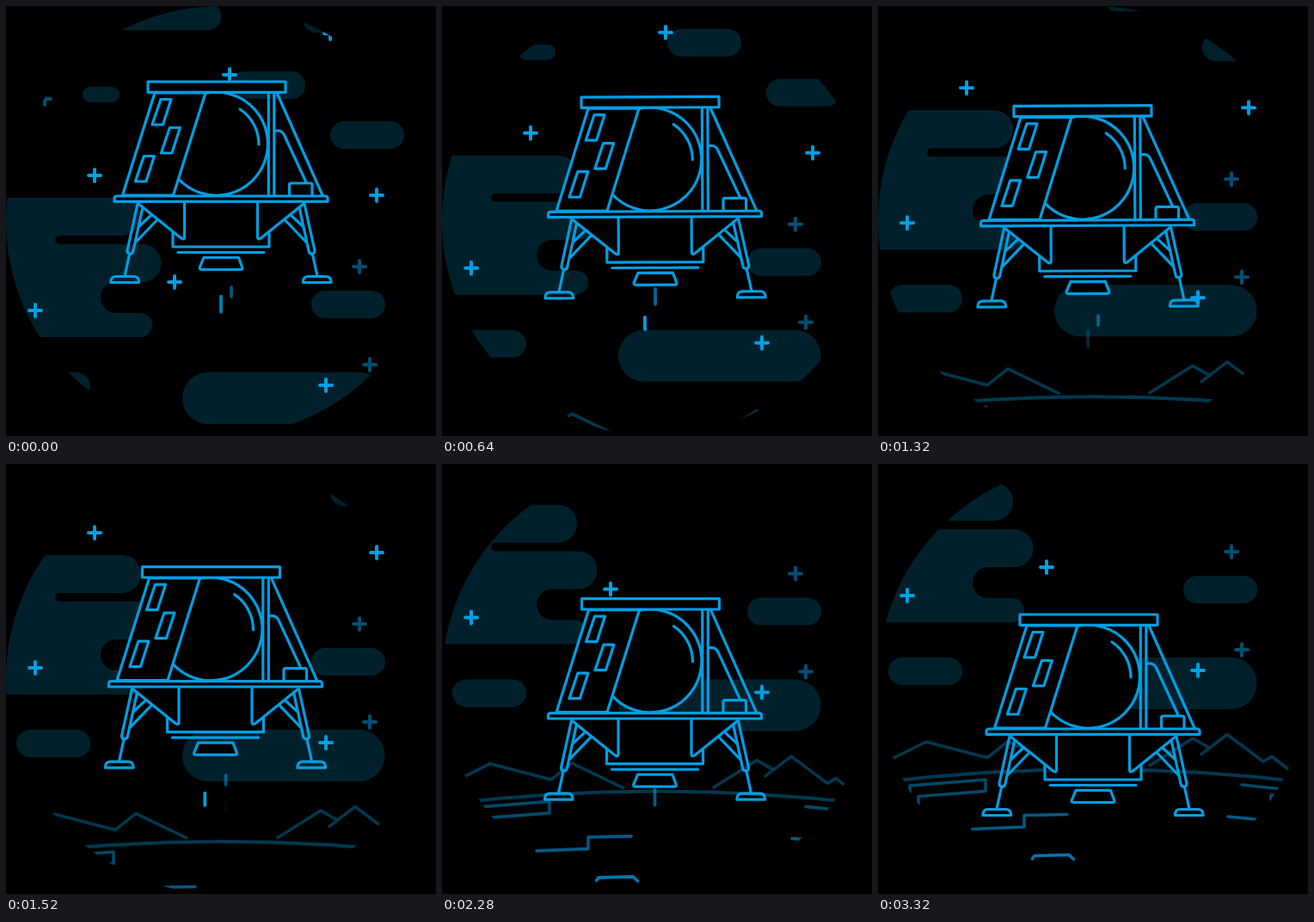
An HTML page with a canvas that plays this animation: 500 px wide and 500 px high, repeating every 3.44 s.

```html
<!DOCTYPE html>
<html lang="en">
<head>
<meta charset="utf-8">
<title>Lunar landing</title>
<style>
html, body { margin: 0; width: 100%; height: 100%; overflow: hidden; background: #000; }
canvas { display: block; width: 500px; height: 500px; }
</style>
</head>
<body>
<canvas id="stage" width="500" height="500"></canvas>
<script>
const ctx = document.getElementById('stage').getContext('2d');
const LOOP = 3440, STEP = 40, TOUCHDOWN = 2610, SETTLED = 3320, DROP = 201;
const BLUE = '#009fe3', DIM = '#004f73', CLOUD = '#00212c';
const FAR = '#00384f', MID = '#004a68', NEAR = '#005a82', FRONT = '#0077ab';

// Key poses of the lander: time, x, y, degrees
const poses = [
  [0, 0, 0, 0], [640, -2.5, 17.8, -0.25], [1080, -5.5, 23.9, -0.5], [1520, -6.5, 31.7, 0],
  [1880, -2, 39.1, 0.25], [2280, -2.5, 68.7, 0], [TOUCHDOWN, 0, 87, 0]
];

function slope(i, k) {
  const b = poses[i + 1], a = poses[Math.max(i - 1, 0)];
  return b ? (b[k] - a[k]) / (b[0] - a[0]) : 0;
}

// Smooth curve through the key poses
function track(t, k) {
  t = Math.min(t, TOUCHDOWN);
  const i = Math.max(poses.findIndex(p => p[0] >= t) - 1, 0);
  const a = poses[i], b = poses[i + 1], d = b[0] - a[0], u = (t - a[0]) / d, v = 1 - u;
  return v * v * (1 + 2 * u) * a[k] + u * u * (1 + 2 * v) * b[k] +
         u * v * d * (v * slope(i, k) - u * slope(i + 1, k));
}

function draw(path, stroke, width, fill) {
  const p = new Path2D(path);
  if (fill) { ctx.fillStyle = fill; ctx.fill(p); }
  if (stroke) { ctx.strokeStyle = stroke; ctx.lineWidth = width; ctx.stroke(p); }
}

function line(x1, y1, x2, y2, color, width) {
  draw(`M${x1} ${y1}L${x2} ${y2}`, color, width);
}

function pill(x, y, w, h) {
  ctx.beginPath();
  ctx.roundRect(x, y, w, h, h / 2);
  ctx.fillStyle = CLOUD;
  ctx.fill();
}

function star(x, y, color) {
  draw(`M${x - 7} ${y}h14M${x} ${y - 7}v14`, color, 4);
}

const cloudBank = 'M-20 223H135a22 22 0 0 1 0 44H62a5 5 0 0 0 0 10H158.5a22 22 0 0 1 0 44H128' +
  'a18 18 0 0 0 0 36H156a14 14 0 0 1 0 28H-20Z';
const stars = [[260, 80], [103, 197], [431, 220], [196, 321], [34, 354], [372, 441], [377, 32]];
const dimStars = [[411, 303], [423, 417], [45, 108]];

function sky() {
  draw(cloudBank, null, 0, CLOUD);
  pill(89, 94, 43, 18);
  pill(205, 426, 235.5, 60);
  pill(100, -4, 150.5, 32);
  for (const [x, y] of [[262, 76], [377, 134], [355, 331], [12, 426], [345, -1]]) pill(x, y, 86, 32);
  stars.forEach(([x, y]) => star(x, y, BLUE));
  dimStars.forEach(([x, y]) => star(x, y, DIM));
}

function ground() {
  draw('M0 351L56 323L127 341.5L151 322.5L210 351', FAR, 3.6);
  draw('M316 350.5L366 319L385 330M376 337.5L406 314.5L448 346L458 340L486 362', FAR, 3.6);
  draw('M0 370.5Q250 339.5 500 370.5', FAR, 4);
  draw('M125 367L37 374V383M125 367V380.5L47 386.5V395', MID, 3.6);
  draw('M423 373L470 378M472 385H457V392', MID, 3.6);
  draw('M110 424.5L170 422V408.5L220 407.5M407 410L439 413', NEAR, 3.6);
  draw('M179.5 459L182 455.5L222 454.5L227.5 459.5', FRONT, 3.6);
}

const leg = 'M153 230L141 284.5Q141 288 144 288Q147 288.5 147.8 285.5L159 234' +
  'M169 243L154 257M176 248.5L150.5 275M143.5 289L138 314' +
  'M122 321.5V320Q122.5 314.5 128 314.5H148.5Q154 314.5 154.5 320V321.5Z';
const gusset = 'M154 230L203 269.5Q207.5 273 207.5 268V228';

function lander() {
  const w = 3.2;
  draw('M194 228H306V280H194Z', null, 0, '#000');
  draw('M194 262V280H306V262M200 286.5H300', BLUE, w);
  for (const side of [1, -1]) {
    ctx.save();
    ctx.translate(250, 0);
    ctx.scale(side, 1);
    ctx.translate(-250, 0);
    draw(gusset, BLUE, w, '#000');
    draw(leg, BLUE, w);
    ctx.restore();
  }
  draw('M230 292.5H270.5L274.8 304Q275.2 306.5 272.5 306.5H227.5Q224.8 306.5 225.2 304Z', BLUE, w, '#000');

  draw('M232 101.5A60 60 0 1 1 200.5 201', BLUE, w, '#000');
  draw('M173 101L135.5 220H194.5L232 101Z', BLUE, w, '#000');
  for (const [x, y] of [[180, 108.5], [190.4, 141.5], [160.4, 174.5]]) {
    draw(`M${x} ${y}h12l-9.5 29.5h-12.5Z`, BLUE, w);
  }
  draw('M272 120A49 49 0 0 1 294 161', BLUE, w);
  draw('M305.3 101V220M311.8 101V220M315 101L368 220', BLUE, w);
  draw('M312 145H316Q321 145 323.5 150L349 205', BLUE, w);
  draw('M329.5 220V208Q329.5 206 331.5 206H354Q356 206 356 208V220', BLUE, w);
  draw('M126 227.3V224Q126 221 129 221H371Q374 221 374 224V227.3Z', BLUE, w, '#000');
  draw('M165 88H325V100.3H165Z', BLUE, w, '#000');
}

// Each jet fires a dash on every marked beat of its rhythm
const jets = [
  { x: 250, y: 308, len: 20, from: -198, beat: 412, rhythm: 'xxxx-xx', power: 1 },
  { x: 237.8, y: 329, len: 16, from: 127, beat: 416, rhythm: 'xx-xx', power: 1 },
  { x: 262, y: 316, len: 13, from: -69, beat: 214, rhythm: 'x-----xx', power: 0.55 }
];

function thrust(t) {
  const life = 320, speed = 0.145;
  for (const jet of jets) {
    [...jet.rhythm].forEach((mark, i) => {
      const age = t - jet.from - i * jet.beat;
      if (mark !== 'x' || age < 0 || age > life) return;
      const top = jet.y + age * speed;
      ctx.globalAlpha = jet.power * Math.min(1, 0.5 + age / 90, (life - age) / 150);
      line(jet.x, top + 1, jet.x, top + jet.len - 1, BLUE, 3.8);
    });
  }
  ctx.globalAlpha = 1;
}

function dust(t) {
  const p = (t - TOUCHDOWN) / (SETTLED - TOUCHDOWN);
  if (p <= 0 || p >= 1) return;
  const out = 27 * (1 - (1 - p) ** 2), len = 6 * (1 - p), lift = 404 - out * 0.4;
  ctx.globalAlpha = 1 - p;
  for (const side of [1, -1]) {
    const x = 250 + side * (131 + out);
    line(x, 409, x + side * len, 409, NEAR, 3);
    line(x - side * 3, lift, x + side * (len - 3), lift - len * 0.4, NEAR, 3);
  }
  ctx.globalAlpha = 1;
}

function render(t) {
  ctx.fillStyle = '#000';
  ctx.fillRect(0, 0, 500, 500);
  ctx.lineCap = ctx.lineJoin = 'round';

  ctx.save();
  ctx.beginPath();
  ctx.arc(250, 250, 250, 0, Math.PI * 2);
  ctx.clip();
  ctx.translate(0, -DROP * Math.min(1, t / TOUCHDOWN));
  sky();
  ctx.translate(0, DROP);
  ground();
  ctx.restore();

  dust(t);
  ctx.save();
  ctx.translate(250 + track(t, 1), 200 + track(t, 2));
  ctx.rotate(track(t, 3) * Math.PI / 180);
  ctx.translate(-250, -200);
  thrust(t);
  lander();
  ctx.restore();
}

const begin = performance.now();
function tick() {
  const t = (performance.now() - begin) % LOOP;
  render(Math.min(SETTLED, Math.floor(t / STEP) * STEP));
  requestAnimationFrame(tick);
}
tick();
</script>
</body>
</html>
```
